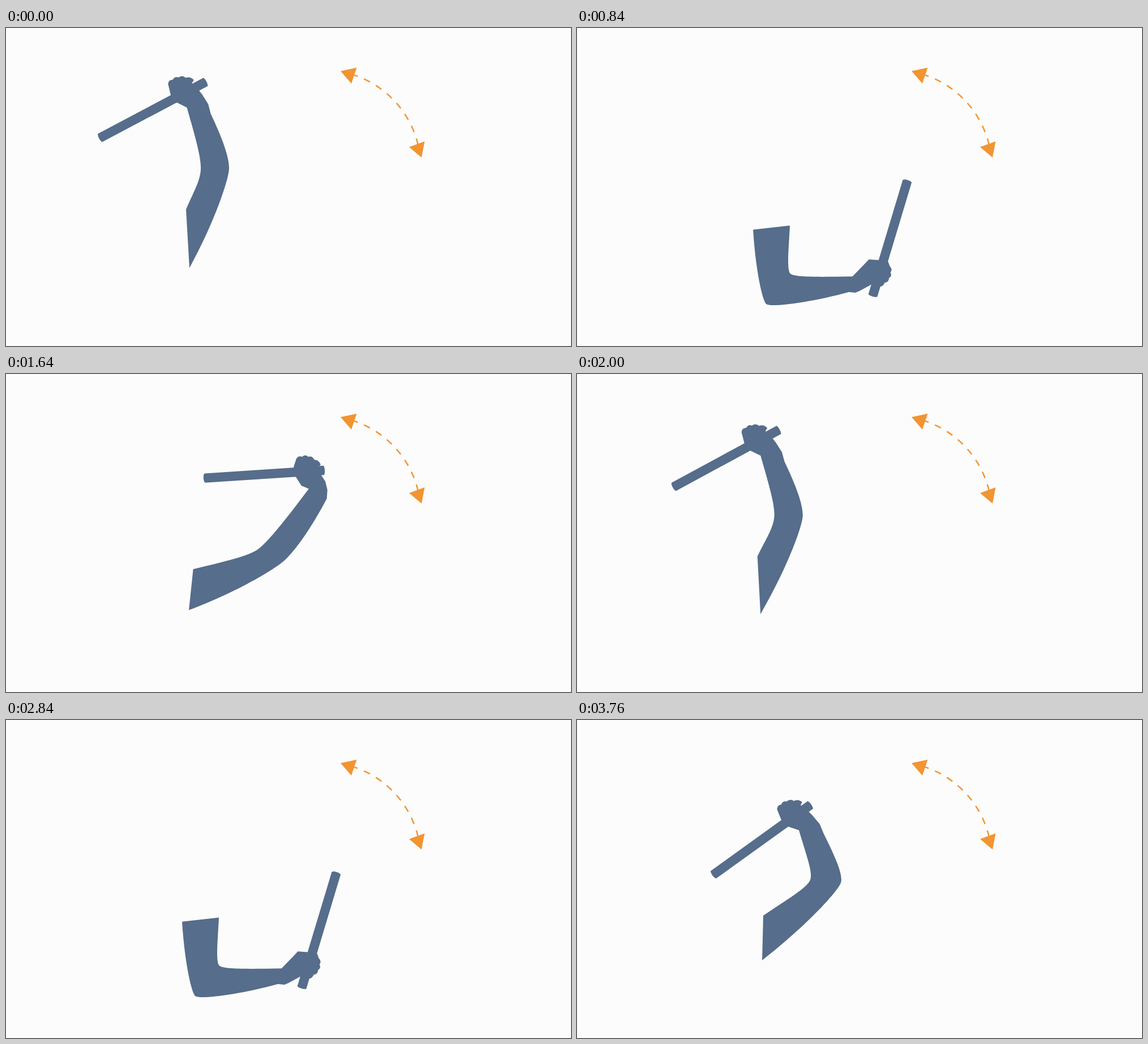
Recreate the animation shown at these times as an HTML page. Size 998 px wide and 561 px high, loop 3800 ms.

```html
<!DOCTYPE html>
<html lang="en">
<head>
<meta charset="utf-8">
<title>Arm swing</title>
<style>
html, body { margin: 0; width: 100%; height: 100%; overflow: hidden; background: #fcfcfc; }
svg { display: block; width: 100%; height: 100%; }
</style>
</head>
<body>
<svg viewBox="0 0 998 561">
  <g fill="#f29432">
    <path d="M609.8 81.4A172 172 0 0 1 727.6 205" fill="none" stroke="#f29432" stroke-width="2.5" stroke-dasharray="12 12"/>
    <path d="M591 76L619.5 70L610 98ZM739.5 200L712 210L734 228.5Z"/>
  </g>
  <g fill="#566d8b">
    <path id="stick"/>
    <path id="arm"/>
  </g>
</svg>
<script>
const LOOP = 3800, STEP = 40, CYCLE = 2000;
const STRIKE = 560, PULL = 640, REST = 840;
const STICK = 211, HALF = 8.2;

// joints are centres; cut and bend reach from the centre to the outer edge
const raised = { shoulder: [321, 371.8], cut: [3, 51.8], elbow: [369, 249], bend: [25, -1], grip: [317, 114], angle: [152.1], slide: [0] };
const cocked = { shoulder: [328, 384.5], cut: [-1, 39.5], elbow: [439.2, 284], bend: [27.2, 2], grip: [386, 168.7], angle: [144.3], slide: [8] };
const strike = { shoulder: [323.5, 361], cut: [-14.5, 28], elbow: [436.5, 426], bend: [3.5, 28], grip: [614.7, 375.3], angle: [279.8], slide: [18] };
const pulled = { shoulder: [342.8, 352.5], cut: [-31.8, 4.5], elbow: [359, 459], bend: [-20, 27], grip: [537.4, 430.6], angle: [286.5], slide: [0] };

const mix = (a, b, k) => a + (b - a) * k;
const mixAll = (a, b, k) => a.map((v, i) => mix(v, b[i], k));
const clamp = x => Math.min(1, Math.max(0, x));
const add = (a, b, k = 1) => [a[0] + b[0] * k, a[1] + b[1] * k];
const unit = v => {
  const d = Math.hypot(...v) || 1;
  return [v[0] / d, v[1] / d];
};
const pt = p => p[0].toFixed(2) + " " + p[1].toFixed(2);

const mapPose = f => Object.fromEntries(Object.keys(raised).map(name => [name, f(name)]));
const mixPose = (a, b, k) => mapPose(name => mixAll(a[name], b[name], k));
const bottom = mixPose(strike, pulled, 1.04);
const lowTop = mixPose(raised, cocked, .065);

// monotone cubic through the key values
function curve(xs, ys, x) {
  const last = xs.length - 1;
  if (x >= xs[last]) return ys[last];
  let i = 0;
  while (x > xs[i + 1]) i++;
  const rate = j => (ys[j + 1] - ys[j]) / (xs[j + 1] - xs[j]);
  const slope = j => {
    if (j === 0 || j === last) return 0;
    const a = rate(j - 1), b = rate(j);
    return a * b <= 0 ? 0 : 2 * a * b / (a + b);
  };
  const w = xs[i + 1] - xs[i], s = (x - xs[i]) / w, r = 1 - s;
  return ys[i] * r * r * (1 + 2 * s) + ys[i + 1] * s * s * (3 - 2 * s)
    + w * s * r * (slope(i) * r - slope(i + 1) * s);
}

function poseAt(t) {
  const turn = Math.round(t / CYCLE);
  const age = Math.abs(t - turn * CYCLE);
  const cock = turn === 2 ? 240 : 260;
  const times = [0, cock, STRIKE, PULL, REST];
  const keys = [turn === 1 ? lowTop : raised, cocked, strike, pulled, bottom];
  const pose = mapPose(name => raised[name].map((_, i) => curve(times, keys.map(k => k[name][i]), age)));

  // the throw swings wide between cocking and striking
  const swing = clamp((age - cock) / (STRIKE - cock));
  const wide = Math.sin(Math.PI * swing) ** 2;
  pose.elbow = add(pose.elbow, [38, 0], wide);
  pose.grip = add(pose.grip, [95, -65], wide);
  pose.fist = swing;
  return pose;
}

// fist outline along and across the stick; k runs from raised to lowered
function fistShape(k) {
  const at = (a, b) => mixAll(a, b, k);
  const first = at([60, 28], [57, 14]), end = at([16.5, 12.7], [17, 5]);
  const knuckles = [1, 2, 3, 4].map(i => add(mixAll(first, end, i / 4), [0, 9 * Math.sin(Math.PI * i / 4)]));
  return {
    thumb: [at([50, -24], [21, -44]), at([50.5, -24], [58, -25]), [62, -8], [65, 8], first],
    knuckles,
    heel: [at([22, 9.5], [17, 3]), [17, -8], at([15.5, -17], [0, -25]), at([14, -37], [-5, -31]), at([18, -54], [-7, -42])]
  };
}

// middle of a to b, pushed sideways by a share of the length
const bow = (a, b, k) => [
  (a[0] + b[0]) / 2 - (b[1] - a[1]) * k,
  (a[1] + b[1]) / 2 + (b[0] - a[0]) * k
];

// two cubics from shoulder to wrist; a straighter elbow is rounder
function side(s, e, w, k) {
  const a = unit(add(e, s, -1)), b = unit(add(w, e, -1));
  const dir = unit(add(a, b));
  const round = 9 + 13 * Math.max(0, a[0] * b[0] + a[1] * b[1]);
  return [s, bow(s, e, k), add(e, dir, -round), e, add(e, dir, round), bow(e, w, k), w];
}

const line = points => points.map(p => "L" + pt(p)).join("");
const cubics = p => "C" + p.slice(1, 4).map(pt).join() + "C" + p.slice(4).map(pt).join();

const stick = document.getElementById("stick");
const arm = document.getElementById("arm");

function draw(now) {
  const pose = poseAt(Math.floor(now % LOOP / STEP) * STEP);
  const rad = pose.angle[0] * Math.PI / 180, c = Math.cos(rad), s = Math.sin(rad);
  const place = ([u, v]) => add(pose.grip, [(u - 40) * c - v * s, (u - 40) * s + v * c]);

  const butt = pose.slide[0], tip = butt + STICK;
  const cap = (u, bulge, h) =>
    line([place([u, -h])]) + "C" + [[u + bulge, -h * .75], [u + bulge, h * .75], [u, h]].map(p => pt(place(p))).join();
  stick.setAttribute("d", "M" + pt(place([butt, -HALF])) + cap(tip - .5, 3, HALF) + cap(butt, -2.5, -HALF) + "Z");

  const fist = fistShape(pose.fist);
  const thumb = fist.thumb.map(place), heel = fist.heel.map(place);
  const inner = side(add(pose.shoulder, pose.cut, -1), add(pose.elbow, pose.bend, -1), thumb[0], .03);
  const outer = side(add(pose.shoulder, pose.cut), add(pose.elbow, pose.bend), heel[heel.length - 1], .06).reverse();

  let from = fist.thumb[4], bumps = "";
  for (const to of fist.knuckles) {
    const n = unit(add(to, from, -1));
    const peak = add(bow(from, to, 0), [n[1], -n[0]], 5);
    bumps += "Q" + pt(place(peak)) + "," + pt(place(to));
    from = to;
  }
  arm.setAttribute("d", "M" + pt(inner[0]) + cubics(inner) + line(thumb) + bumps + line(heel) + cubics(outer) + "Z");
}

function tick() {
  draw(performance.now());
  requestAnimationFrame(tick);
}
tick();
</script>
</body>
</html>
```
